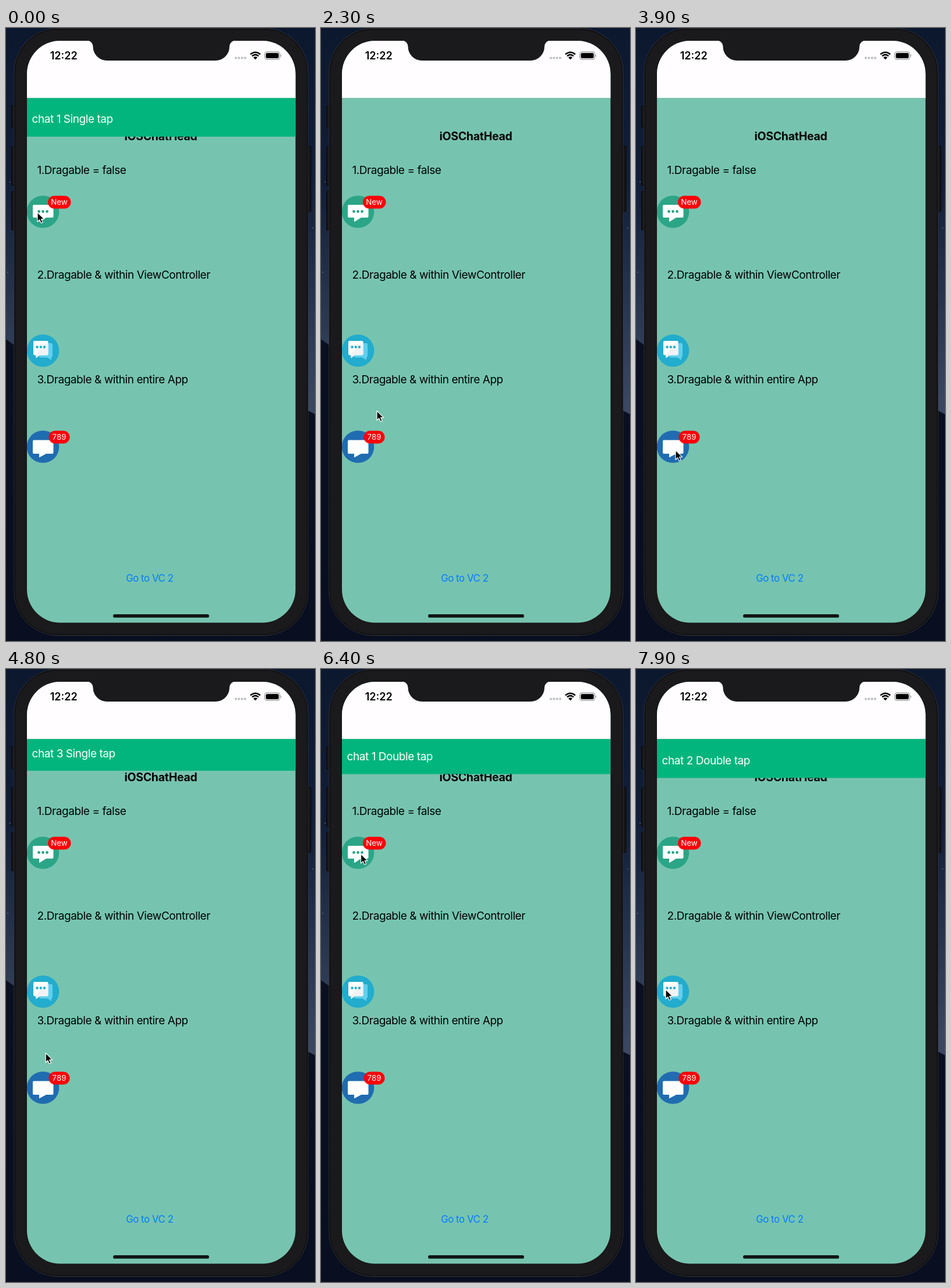
These frames come from a looping animation (531 px wide and 1054 px high, 8000 ms). An HTML page:

```html
<!DOCTYPE html>
<html lang="en">
<head>
<meta charset="utf-8">
<title>Chat heads</title>
<style>
  html, body { margin: 0; width: 100%; height: 100%; overflow: hidden; background: #090f20; }
  svg { display: block; width: 100%; height: 100%; }
  text { font: 19px Inter, "Liberation Sans", sans-serif; letter-spacing: -.023em; }
  .title { font-size: 19.5px; font-weight: 700; letter-spacing: -.015em; }
  .clock { font-size: 18px; font-weight: 600; letter-spacing: 0; }
  .link { font-size: 16.7px; fill: #007aff; }
  .badge { font-size: 13.4px; letter-spacing: 0; fill: #fff; }
  .mid { text-anchor: middle; }
</style>
</head>
<body>
<svg viewBox="0 0 531 1054" preserveAspectRatio="none">
  <defs>
    <linearGradient id="sky" x2="0" y2="1">
      <stop offset="0" stop-color="#0c182e"/>
      <stop offset=".25" stop-color="#111e37"/>
      <stop offset=".5" stop-color="#2e3b55"/>
      <stop offset=".65" stop-color="#3f4b64"/>
    </linearGradient>
    <linearGradient id="hill" x2="0" y2="1">
      <stop offset="0" stop-color="#0a1021"/>
      <stop offset="1" stop-color="#090f20"/>
    </linearGradient>
    <clipPath id="screen"><rect x="36" y="22" width="461.5" height="1000.5" rx="57"/></clipPath>
    <clipPath id="below"><rect x="36" y="120.5" width="461.5" height="200"/></clipPath>
  </defs>

  <rect width="531" height="1054" fill="url(#sky)"/>
  <path d="M0 535L24 552L500 648L531 664V1054H0Z" fill="url(#hill)"/>
  <g fill="#8693ad"><circle cx="7" cy="265" r=".8"/><circle cx="3" cy="420" r=".8"/><circle cx="527" cy="344" r=".8"/></g>

  <g fill="#161618" stroke="#050507">
    <rect x="9.5" y="133.5" width="8" height="38" rx="2"/>
    <rect x="9.5" y="204" width="8" height="67" rx="2"/>
    <rect x="9.5" y="280.5" width="8" height="67" rx="2"/>
    <rect x="516" y="203.5" width="8" height="112" rx="2"/>
  </g>
  <rect x="14" y=".5" width="505" height="1044" rx="76" fill="#1a191b" stroke="#38393d"/>
  <rect x="15.2" y="1.7" width="502.6" height="1041.6" rx="75" fill="none" stroke="#0c0c0e" stroke-width="1.4"/>

  <g clip-path="url(#screen)">
    <rect x="36" y="22" width="462" height="1001" fill="#76c4af"/>
    <text class="title mid" x="266" y="192.5">iOSChatHead</text>
    <text x="53.5" y="251">1.Dragable = false</text>
    <text x="53.5" y="431">2.Dragable &amp; within ViewController</text>
    <text x="53.5" y="610.5">3.Dragable &amp; within entire App</text>
    <text class="link mid" x="246.8" y="952">Go to VC 2</text>

    <g>
      <circle cx="63.5" cy="316" r="27.8" fill="#2ca587"/>
      <path d="M48 304H79.5Q81.500 304 81.500 306V324Q81.500 326 79.500 326H69L57 333.500V326H48Q46 326 46 324V306Q46 304 48 304Z" fill="#fff"/>
      <g fill="#2ca587"><circle cx="56.5" cy="315.5" r="2.4"/><circle cx="63.5" cy="315.5" r="2.4"/><circle cx="70.5" cy="315.5" r="2.4"/></g>
      <circle class="shade" cx="63.5" cy="316" r="27.8" opacity="0"/>
      <rect x="72" y="288.5" width="39.5" height="22" rx="11" fill="#fa0008"/>
      <text class="badge mid" x="91.5" y="304.3">New</text>
    </g>

    <g>
      <circle cx="63.5" cy="554.7" r="27.8" fill="#22accd"/>
      <path d="M59 542H78Q80 542 80 544V564Q80 566 78 566V571L71 566.5H59Q57 566 57 564Z" fill="#60d0ec"/>
      <path d="M49 538H70.500Q72.500 538 72.500 540V560.500Q72.500 562.500 70.500 562.500H58L51.500 567.500V562.500H49Q47 562.500 47 560.500V540Q47 538 49 538Z" fill="#fff"/>
      <path d="M72.500 540V560.500Q72.500 562.500 70.500 562.500H58L51.500 567.500V562.500H49Z" fill="#f1f2f4"/>
      <g fill="#22accd"><circle cx="53.5" cy="548.5" r="2.2"/><circle cx="59.7" cy="548.5" r="2.2"/><circle cx="65.9" cy="548.5" r="2.2"/></g>
      <circle class="shade" cx="63.5" cy="554.7" r="27.8" opacity="0"/>
    </g>

    <g>
      <circle cx="63.5" cy="720" r="27.8" fill="#206cb0"/>
      <path d="M48 708.500H79.500Q81.500 708.500 81.500 710.500V730Q81.500 732 79.500 732H69L57 738.500V732H48Q46 732 46 730V710.500Q46 708.500 48 708.500Z" fill="#fff"/>
      <circle class="shade" cx="63.5" cy="720" r="27.8" opacity="0"/>
      <rect x="73.5" y="692.5" width="36" height="22" rx="11" fill="#fa0008"/>
      <text class="badge mid" x="91.5" y="708.3">789</text>
    </g>

    <rect x="184" y="1008" width="165" height="5.8" rx="2.9" fill="#101413"/>
    <rect x="36" y="22" width="462" height="98.5" fill="#fffdff"/>
    <path d="M36 121H498" stroke="#68ab99" stroke-width=".8"/>

    <g clip-path="url(#below)">
      <g id="banner">
        <rect x="36" y="100" width="462" height="87.4" fill="#02b57c"/>
        <text id="message" x="44.5" y="164" fill="#fff"></text>
      </g>
    </g>

    <path d="M139 21.500A10.500 10.500 0 0 1 149.500 32A24 24 0 0 0 173.500 56H360A24 24 0 0 0 384 32A10.500 10.500 0 0 1 394.500 21.500Z" fill="#1a191b"/>
    <text class="clock mid" x="99.2" y="54">12:22</text>
    <g fill="#bcbcc0"><circle cx="395" cy="51.5" r="2"/><circle cx="400.3" cy="51.5" r="2"/><circle cx="405.6" cy="51.5" r="2"/><circle cx="410.9" cy="51.5" r="2"/></g>
    <path d="M428.500 54.300L425 50.700Q428.500 47.800 432 50.700Z"/>
    <path d="M423 48.300Q428.500 43.500 434 48.300M420 45.200Q428.500 38.200 437 45.200" fill="none" stroke="#000" stroke-width="2.5"/>
    <rect x="444.6" y="41.1" width="26" height="12.8" rx="3.8" fill="none" stroke="#8c8c8e" stroke-width="1.1"/>
    <rect x="446.5" y="43" width="22.2" height="9" rx="2.2"/>
    <path d="M472 45.200Q474.200 47.500 472 49.800Z" fill="#8c8c8e"/>
  </g>

  <path id="cursor" d="M0 0V16.200L3.700 12.700L6.300 18.500L9.100 17.300L6.600 11.600H11.600Z" stroke="#fff" stroke-width="1.2" stroke-linejoin="round"/>
</svg>
<script>
const LOOP = 8000, SLIDE = 250, STAY = 1273, HEIGHT = 67;

// time, x, y
const path = [
  [0, 54, 317], [250, 54, 317], [1000, 59, 552], [2050, 59, 552],
  [2400, 105, 684], [2700, 95, 706], [3700, 68, 726], [4500, 68, 726],
  [5700, 69, 308], [6300, 69, 308], [7150, 57, 564], [7250, 57, 564], [7500, 51, 551]
];
// start time, message
const banners = [
  [-235, "chat 1 Single tap"], [2350, "chat 2 Single tap"], [4620, "chat 3 Single tap"],
  [6200, "chat 1 Double tap"], [7520, "chat 2 Double tap"]
];
// start time, icon index
const presses = [[1950, 1], [4240, 2], [5960, 0], [6140, 0], [7300, 1], [7460, 1]];

const banner = document.getElementById("banner");
const message = document.getElementById("message");
const cursor = document.getElementById("cursor");
const shades = document.querySelectorAll(".shade");

const clamp = v => Math.min(1, Math.max(0, v));
const ease = v => { v = clamp(v); return v * v * (3 - 2 * v); };

function cursorAt(t) {
  const i = path.findIndex(key => key[0] > t);
  if (i < 0) return path[path.length - 1].slice(1);
  const [t0, x0, y0] = path[i - 1], [t1, x1, y1] = path[i];
  const p = ease((t - t0) / (t1 - t0));
  return [x0 + (x1 - x0) * p, y0 + (y1 - y0) * p];
}

function draw(t) {
  cursor.setAttribute("transform", `translate(${cursorAt(t)})`);

  const [begin, label] = banners.filter(b => b[0] <= t).pop();
  const age = t - begin;
  const shown = ease(age / SLIDE) - ease((age - STAY) / SLIDE);
  message.textContent = label;
  banner.setAttribute("transform", `translate(0 ${-HEIGHT * (1 - shown)})`);
  banner.setAttribute("visibility", shown > 0 ? "visible" : "hidden");

  shades.forEach((shade, icon) => {
    const down = presses.some(([start, index]) => index === icon && t >= start && t < start + 100);
    shade.setAttribute("opacity", down ? .5 : 0);
  });
}

const start = performance.now();
function tick() {
  draw((performance.now() - start) % LOOP);
  requestAnimationFrame(tick);
}
tick();
</script>
</body>
</html>
```
